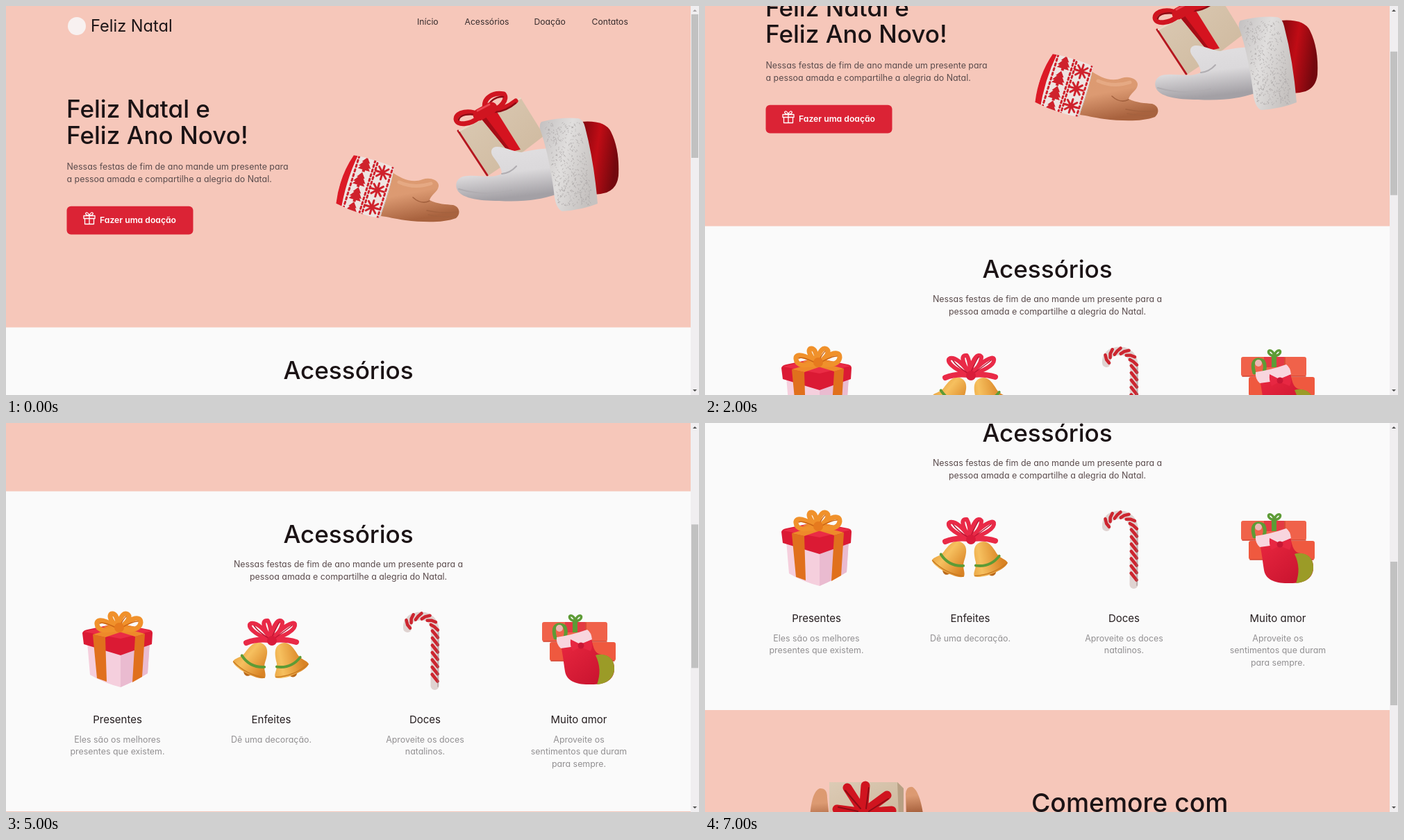
Recreate the animation shown at these times as an HTML page. Size 998 by 561 pixels, loop 8000 ms.

```html
<!DOCTYPE html>
<html lang="pt">
<head>
<meta charset="utf-8">
<title>Feliz Natal</title>
<style>
  html, body { margin: 0; width: 100%; height: 100%; overflow: hidden; background: #f6c7ba; }
  svg { display: block; width: 998px; height: 561px; }
  text { font: 12.4px Inter, "Open Sans", sans-serif; font-feature-settings: "cv11"; fill: #5b4c4d; }
  .nav { font-size: 12.2px; fill: #372c2d; }
  .brand { font-size: 23.6px; fill: #1d1517; }
  .big { font-size: 35.1px; font-weight: 500; fill: #1b1315; }
  .mid { text-anchor: middle; }
  .name { font-size: 15px; fill: #241c1e; }
  .note { fill: #929092; }
  .label { font-size: 12.2px; font-weight: 600; fill: #fff; }
  .line { fill: none; stroke-linecap: round; stroke-linejoin: round; }
</style>
</head>
<body>
<svg viewBox="0 0 998 561">
  <defs>
    <linearGradient id="skin" x2=".3" y2="1"><stop stop-color="#dd9a70"/><stop offset=".5" stop-color="#dc9a72"/><stop offset="1" stop-color="#a8623e"/></linearGradient>
    <linearGradient id="glove" x2=".2" y2="1"><stop stop-color="#e2e0e2"/><stop offset=".55" stop-color="#dbd9db"/><stop offset="1" stop-color="#a3a0a5"/></linearGradient>
    <linearGradient id="fur" x2="1" y2=".4"><stop stop-color="#c3c0c0"/><stop offset=".5" stop-color="#e0dedd"/><stop offset="1" stop-color="#c6c2c0"/></linearGradient>
    <linearGradient id="velvet" x2="1" y2=".3"><stop stop-color="#7d060e"/><stop offset=".5" stop-color="#c00c15"/><stop offset="1" stop-color="#74080e"/></linearGradient>
    <linearGradient id="paper" x2="1" y2="1"><stop stop-color="#dccbb5"/><stop offset="1" stop-color="#cdb79c"/></linearGradient>
    <linearGradient id="gold" x2="1" y2=".2"><stop stop-color="#e59a35"/><stop offset=".4" stop-color="#f6c05f"/><stop offset="1" stop-color="#d98324"/></linearGradient>
    <linearGradient id="sock" x2="1" y2="1"><stop stop-color="#ea2840"/><stop offset="1" stop-color="#c3102c"/></linearGradient>
    <clipPath id="cuff"><path d="M4 0Q34 -4 65 0Q69 38 66 76Q34 80 0 74Q-7 35 4 0Z"/></clipPath>
    <g id="flake" class="line" stroke="#cf222c" stroke-width="3"><path d="M-10 0H10M0-10V10M-7-7L7 7M7-7L-7 7"/></g>
    <path id="tree" fill="#cf222c" d="M0-11L6-3H4L9 4H6L9 8H2V11H-2V8H-9L-6 4H-9L-4-3H-6Z"/>
    <g id="bell">
      <circle cy="48" r="6" fill="#b9691c"/>
      <path fill="url(#gold)" d="M0 0C12 0 15 12 17 25C19 34 27 38 27 44C20 53-20 53-27 44C-27 38-19 34-17 25C-15 12-12 0 0 0Z"/>
      <path class="line" stroke="#5d9b36" stroke-width="4" d="M-19 30Q0 41 19 30"/>
      <path class="line" stroke="#c97b22" stroke-width="1.5" d="M-26 44Q0 53 26 44"/>
    </g>
  </defs>

  <g id="page">
    <path fill="#f6c7ba" d="M0 0H986V464H0ZM0 925H986V1100H0Z"/>
    <path fill="#fafafa" d="M0 463.5H986V925H0Z"/>

    <circle cx="102" cy="29" r="13" fill="#f8f1f0"/>
    <text class="brand" x="122" y="37">Feliz Natal</text>
    <text class="nav" x="592" y="27">Início</text>
    <text class="nav" x="660.5" y="27">Acessórios</text>
    <text class="nav" x="760.5" y="27">Doação</text>
    <text class="nav" x="843.5" y="27">Contatos</text>

    <text class="big" x="87" y="160.5">Feliz Natal e</text>
    <text class="big" x="87" y="199">Feliz Ano Novo!</text>
    <text x="87.5" y="236">Nessas festas de fim de ano mande um presente para</text>
    <text x="87.5" y="254.3">a pessoa amada e compartilhe a alegria do Natal.</text>
    <rect x="87.5" y="288.7" width="182" height="40.7" rx="6" fill="#db2335"/>
    <path class="line" stroke="#fff" stroke-width="1.3" d="M112 302.5H128V306.5H112ZM113.5 306.5V314.5H126.5V306.5M120 302.5V314.5M120 302C113 302 114 297 117 298Q119 299 120 302C127 302 126 297 123 298Q121 299 120 302"/>
    <text class="label" x="135" y="313">Fazer uma doação</text>

    <!-- child's hand -->
    <path fill="url(#skin)" d="M554 238C568 249 585 256 600 250C612 246 624 252 623 260C622 268 612 272 610 280C622 286 634 286 644 287C654 290 655 300 648 306C630 313 600 312 575 309C560 307 550 304 540 303Z"/>
    <path class="line" stroke="#a4623f" stroke-width="1.5" d="M586 276Q598 287 610 281M606 295Q630 300 651 297M608 301Q630 306 649 303"/>
    <path class="line" stroke="#efba96" stroke-width="5" stroke-opacity=".5" d="M566 254Q588 264 612 256"/>
    <g transform="translate(497 214) rotate(17)">
      <g clip-path="url(#cuff)">
        <path fill="#eee4e1" d="M-10-8H75V85H-10Z"/>
        <path fill="#dc1a26" d="M-10-8H11Q3 36 10 85H-10Z"/>
        <g class="line" stroke="#cf222c" stroke-width="3" stroke-dasharray="3 4">
          <path d="M12-2V80M36-2V80M40 1V80M63-2V80"/>
        </g>
        <use href="#tree" x="24" y="8"/><use href="#tree" x="23" y="31"/><use href="#tree" x="24" y="53"/><use href="#tree" x="24" y="75"/>
        <use href="#flake" x="51" y="12"/><use href="#flake" x="51" y="38"/><use href="#flake" x="51" y="64"/>
        <path class="line" stroke="#c9bdb9" stroke-width="2" d="M66 0Q69 38 66 76"/>
      </g>
    </g>

    <!-- present and gloved hand -->
    <path fill="url(#paper)" d="M651 180L741 132L775 187L737 216L694 245Z"/>
    <path class="line" stroke="#b5161f" stroke-width="3" d="M651 180L693 244"/>
    <path class="line" stroke="#e8dac6" stroke-width="2" d="M653 180L741 133"/>
    <path fill="#d5131f" d="M684 162L706 151L741 207L724 211Z"/>
    <path fill="#a50d17" d="M684 162L690 159L728 210L724 211Z"/>
    <g class="line" stroke="#d01520" stroke-width="7">
      <path d="M682 157C668 150 648 152 648 163C649 173 668 172 682 160M690 149C686 132 702 124 717 127C723 134 714 147 697 152M700 150Q718 150 734 137"/>
      <path stroke="#8f0b14" stroke-width="2.5" d="M680 158C668 154 653 157 652 164M694 148C695 137 706 130 716 131M704 153Q720 152 734 140"/>
      <path stroke-width="17" d="M681 157L699 147"/>
      <path stroke="#ec4650" stroke-width="3" d="M679 151L696 142"/>
    </g>
    <path fill="url(#velvet)" d="M828 167Q862 164 871 181Q884 207 882 245Q880 263 865 269Q855 272 846 272Z"/>
    <path fill="url(#glove)" d="M785 205C765 206 752 209 742 211C728 209 715 202 706 203C698 204 697 212 702 218C708 226 714 234 714 242C700 249 685 244 665 245C652 245 646 254 649 263C653 277 680 281 710 281C745 283 770 279 792 272Z"/>
    <path class="line" stroke="#b0adb1" stroke-width="2" d="M714 242Q726 241 735 231M652 264Q690 275 728 266"/>
    <path fill="url(#fur)" d="M771 167Q800 160 824 162Q831 163 834 175Q847 225 852 285Q830 294 801 296Q791 292 789 268Q782 214 769 177Q768 170 771 167Z"/>
    <path id="tufts" class="line" stroke="#aaa6a6" stroke-opacity=".7"/>

    <text class="big mid" x="493" y="537.5">Acessórios</text>
    <text class="mid" x="493" y="573">Nessas festas de fim de ano mande um presente para a</text>
    <text class="mid" x="493" y="590.5">pessoa amada e compartilhe a alegria do Natal.</text>

    <g transform="translate(0 365)">
      <!-- gift box -->
      <path fill="#f5cfdd" d="M117 316L165 332L207 316L204 361Q186 372 165 381Q141 375 121 363Z"/>
      <path fill="#eabbd0" d="M165 332L207 316L204 361Q186 372 165 381Z"/>
      <path fill="#db1a34" d="M110 303Q111 299 117 298L160 289L206 298Q211 299 211 303L210 319L165 335L112 319Z"/>
      <path fill="#ea2c45" d="M112 301L160 289L210 300L165 311Z"/>
      <path fill="#e0701d" d="M125 305L143 309L145 373L131 368ZM186 308L200 304L196 366L182 374Z"/>
      <path fill="#ee8a2a" d="M125 305L172 291L187 294L143 309ZM140 294L151 291L200 304L186 308Z"/>
      <g class="line" stroke="#f0912b" stroke-width="7">
        <path d="M161 297C145 284 130 281 131 290C132 302 147 299 161 297ZM160 295C142 276 153 271 158 278Q162 286 162 296C163 278 172 270 177 278Q178 286 163 296ZM164 297C182 279 194 278 194 288C192 300 176 299 164 297"/>
        <path stroke="#cc6516" stroke-width="1.5" d="M160 296Q140 286 135 289M165 296Q182 286 190 286M163 295Q169 282 173 279"/>
      </g>
      <circle cx="163" cy="295" r="7" fill="#e67a1e"/>

      <!-- bells -->
      <use href="#bell" transform="translate(396 318) rotate(-22) scale(.96)"/>
      <use href="#bell" transform="translate(369 318) rotate(27) scale(.96)"/>
      <g class="line" stroke="#e92a47" stroke-width="6">
        <path d="M382 313C356 305 346 292 353 289C362 287 374 300 382 313ZM382 313C366 289 371 284 377 285Q382 293 382 313C384 288 394 281 398 287Q398 299 382 313C398 294 413 285 416 290C418 299 399 308 382 313"/>
        <path stroke-width="8" d="M380 313Q360 311 346 317M384 313Q403 311 418 316"/>
        <path stroke="#bd1633" stroke-width="1.5" d="M379 311Q362 300 357 292M383 309Q390 293 394 287M386 311Q403 299 412 292"/>
      </g>
      <circle cx="383" cy="314" r="7" fill="#d91b3a"/>

      <!-- candy cane -->
      <path id="cane" class="line" stroke="#dfd3d1" stroke-width="12" d="M578 296C577 284 586 278.500 598 278.500C611 278.500 618 288 618 302L617.500 379"/>
      <path id="stripes" class="line" stroke="#cd2630" stroke-width="4.600"/>
      <path class="line" stroke="#8d7d7d" stroke-opacity=".4" stroke-width="2" d="M622.500 302L622 380"/>

      <!-- stocking -->
      <rect x="772" y="287" width="94" height="28" rx="3" fill="#f0624a"/>
      <rect x="783" y="316" width="95" height="27" rx="3" fill="#ef593f"/>
      <path class="line" stroke="#d24430" stroke-width="1.5" d="M774 315H865M785 343H876M835 288V314"/>
      <path fill="#e33a43" d="M805 287H834V302H805Z"/>
      <path fill="#5d9b36" d="M816 285H823V302H816Z"/>
      <path class="line" stroke="#5d9b36" stroke-width="3.5" d="M820 286C809 284 810 276 815 278Q819 280 820 286C831 284 830 276 825 278Q821 280 820 286"/>
      <path class="line" stroke="#5d9b36" stroke-width="5" d="M791 310C785 291 796 288 804 293Q808 299 805 309"/>
      <circle cx="797" cy="296" r="5" fill="#edb7b4"/>
      <path fill="url(#sock)" d="M799 320L843 311C846 325 848 333 858 334C872 336 877 345 876 357C874 372 862 377 843 377C822 378 807 372 805 358C803 345 802 335 799 320Z"/>
      <path fill="#9b9b27" d="M849 335Q853 333 860 334C872 336 877 345 876 357C874 370 864 376 851 377Q859 355 849 335Z"/>
      <path fill="#f8d5de" d="M793 309Q814 306 837 298Q843 302 844 312Q825 323 799 325Q792 319 793 309Z"/>
      <path fill="#e72742" d="M827 319L813 312Q812 322 816 329L827 323L842 329Q846 320 842 313Z"/>
      <circle cx="828" cy="321" r="4.5" fill="#c91735"/>

      <g class="mid">
        <text class="name" x="160.5" y="433">Presentes</text>
        <text class="name" x="382" y="433">Enfeites</text>
        <text class="name" x="603.5" y="433">Doces</text>
        <text class="name" x="825" y="433">Muito amor</text>
        <text class="note" x="160.5" y="460.5">Eles são os melhores</text>
        <text class="note" x="160.5" y="478">presentes que existem.</text>
        <text class="note" x="382" y="460.5">Dê uma decoração.</text>
        <text class="note" x="603.5" y="460.5">Aproveite os doces</text>
        <text class="note" x="603.5" y="478">natalinos.</text>
        <text class="note" x="825" y="460.5">Aproveite os</text>
        <text class="note" x="825" y="478">sentimentos que duram</text>
        <text class="note" x="825" y="495.5">para sempre.</text>
      </g>
    </g>

    <g transform="translate(0 511)">
      <path fill="url(#skin)" d="M151 570Q153 532 165 527Q176 526 176 540L179 570ZM290 570L289 535Q290 523 299 525Q310 532 315 570Z"/>
      <path fill="url(#paper)" d="M179 518H277L286 527V570H179Z"/>
      <path fill="#b8a084" d="M277 518L286 527V570H279Z"/>
      <g class="line" stroke="#d0141f" stroke-width="13">
        <path d="M228 562L205 526M228 562L231 523M228 562L262 537M228 562L190 557M228 562L269 559"/>
        <path stroke="#8f0c15" stroke-width="2" d="M224 556L202 530M232 556L236 526M236 560L264 542M220 560L192 554"/>
      </g>
      <text class="big" style="font-size: 37.3px" x="470" y="560.5">Comemore com</text>
    </g>
  </g>

  <path fill="#f0eef0" d="M986 0H998V561H986Z"/>
  <rect id="thumb" x="987" y="12" width="10" height="207" fill="#c1c1c1"/>
  <path id="up" d="M989 8H995L992 5Z"/>
  <path fill="#505050" d="M989 553H995L992 556Z"/>
</svg>
<script>
  const el = id => document.getElementById(id);

  // slanted stripes along the cane
  const cane = el('cane');
  const edge = (s, side) => {
    const p = cane.getPointAtLength(s), q = cane.getPointAtLength(s + 0.5), r = cane.getPointAtLength(s - 0.5);
    const a = Math.atan2(q.y - r.y, q.x - r.x);
    return `${p.x - Math.sin(a) * side} ${p.y + Math.cos(a) * side}`;
  };
  let stripes = '';
  for (let s = 0; s < cane.getTotalLength() - 9; s += 10.5) {
    stripes += `M${edge(s, 4)}L${edge(s + 5, 0)}L${edge(s + 10, -4)}`;
  }
  el('stripes').setAttribute('d', stripes);

  // fur tufts on the cuff
  let seed = 7;
  const random = () => (seed = seed * 16807 % 2147483647) / 2147483647;
  let tufts = '';
  for (let i = 0; i < 420; i++) {
    const v = random(), x = 775 + 20 * v + 52 * random(), y = 168 + 120 * v;
    tufts += `M${x} ${y}l${random() * 3 - 1.5} ${random() * 2}`;
  }
  el('tufts').setAttribute('d', tufts);

  const STEP = 73, STEP_MS = 1000, LOOP_MS = 8000;
  function draw() {
    const scroll = Math.floor(performance.now() % LOOP_MS / STEP_MS) * STEP;
    el('page').setAttribute('transform', `translate(0 ${-scroll})`);
    el('thumb').setAttribute('y', 12 + scroll * 0.368);
    el('up').setAttribute('fill', scroll ? '#505050' : '#a8a3a5');
    requestAnimationFrame(draw);
  }
  draw();
</script>
</body>
</html>
```
